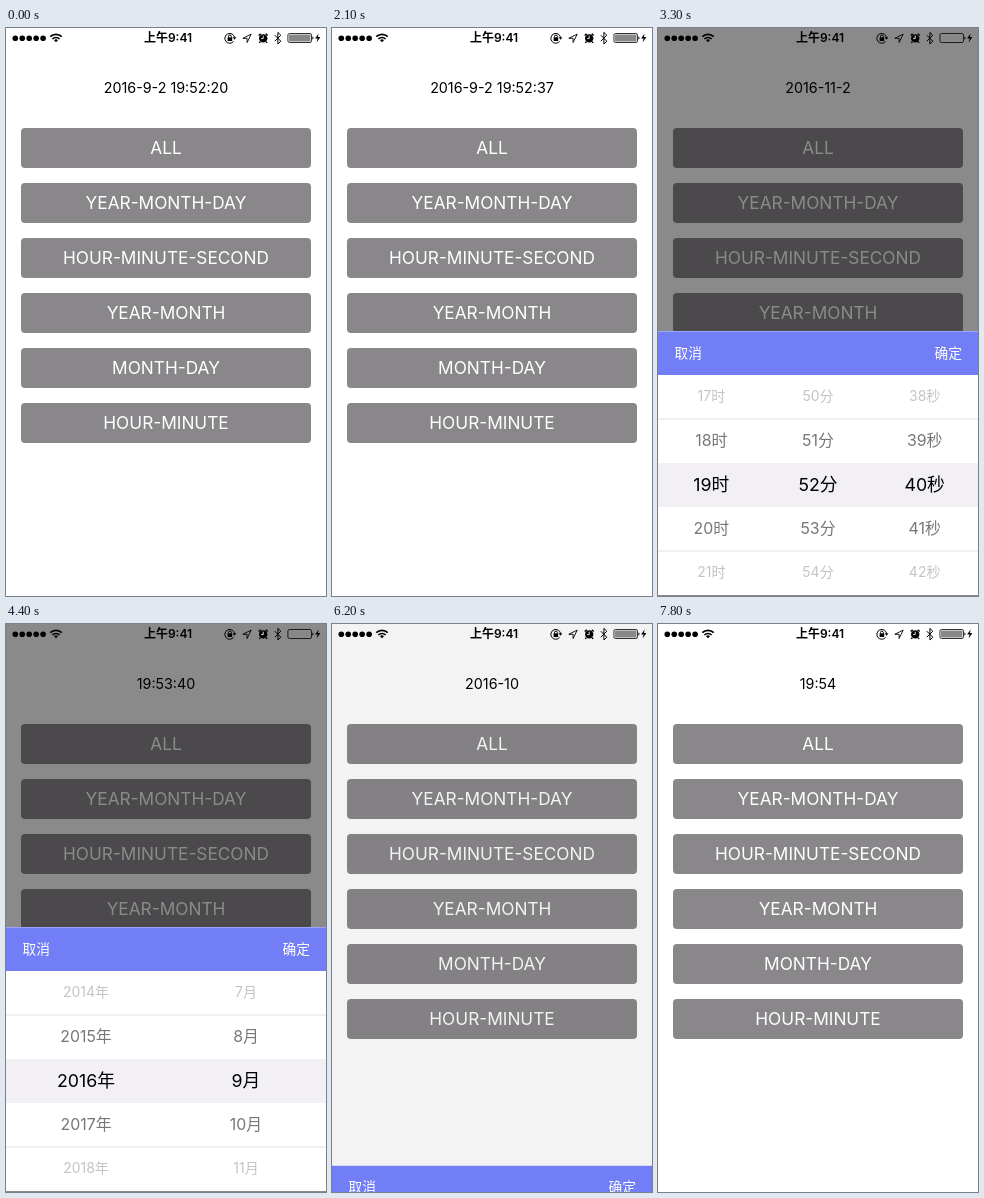
Animation, 320 px wide and 568 px high, one loop 7.9 s. Source, as an HTML page:

```html
<!DOCTYPE html>
<html lang="zh">
<head>
<meta charset="utf-8">
<title>Date picker</title>
<style>
  html, body { margin: 0; width: 100%; height: 100%; overflow: hidden; background: #fff; }
  svg { display: block; width: 100vw; height: 100vh; }
  text { font-family: Inter, 'Noto Sans CJK SC', 'Noto Sans CJK', sans-serif; }
  .mid { text-anchor: middle; }
  .line { fill: none; stroke: #000; }
</style>
</head>
<body>
<svg viewBox="0 0 320 568">
  <rect width="320" height="568" fill="#fff"/>
  <text id="date" class="mid" x="160" y="65.2" font-size="14.3"></text>
  <g id="buttons" class="mid" font-size="17.25" fill="#fff"></g>
  <rect id="shade" width="320" height="568"/>

  <g id="status">
    <g id="dots"></g>
    <g class="line" stroke-width="1.7">
      <path d="M44.3 8.6a8.2 8.2 0 0 1 11.4 0M46.4 11a5.2 5.2 0 0 1 7.2 0"/>
    </g>
    <path d="M50 14.3l-2-2.1a2.9 2.9 0 0 1 4 0z"/>
    <text class="mid" x="162" y="14.3" font-size="12" font-weight="600">上午9:41</text>
    <path class="line" d="M227.6 13.4a4.9 4.9 0 1 1 1-3.8"/>
    <path d="M226.6 9.2h3.8l-1.9 2.5z"/>
    <rect x="221.6" y="9.3" width="4.6" height="3.7"/>
    <path class="line" d="M222.5 9.5v-1a1.4 1.4 0 0 1 2.8 0v1"/>
    <path class="line" stroke-width=".9" d="M236.8 10.3l8.4-4.2-4.1 8.4v-4.2z"/>
    <circle cx="257.2" cy="10.4" r="4.2"/>
    <path class="line" stroke-width="1.5" d="M252.7 7.5l2-1.8M261.7 7.5l-2-1.8M254.3 13.6l-1 1.3M260.1 13.6l1 1.3"/>
    <path d="M257.2 7.7v2.9h-2" fill="none" stroke="#fff" stroke-width=".9"/>
    <path class="line" d="M268.8 7.2l6 6-2.9 2.8V4.4l2.9 2.8-6 6"/>
    <rect class="line" x="281.9" y="5.5" width="23.6" height="9" rx="1.6" stroke-width=".8"/>
    <rect x="283" y="6.6" width="21.4" height="6.8" rx=".6" fill="#8a878b"/>
    <path d="M306.4 8.4a1.7 1.7 0 0 1 0 3.2z"/>
    <path d="M312.6 5.4l-3.5 5.2h2.5l-1 4 3.8-5.5h-2.5z"/>
  </g>

  <g id="sheet">
    <rect y="303" width="320" height="264" fill="#fff"/>
    <rect y="435" width="320" height="44" fill="#f2f0f4"/>
    <path d="M0 391h320M0 523h320" stroke="#e2e0e4"/>
    <clipPath id="clip"><rect y="347" width="320" height="220"/></clipPath>
    <g id="rows" class="mid" clip-path="url(#clip)"></g>
    <rect y="303.3" width="320" height="43.7" fill="#717ef5"/>
    <g font-size="13.7" fill="#fff">
      <text x="16.5" y="329.6">取消</text>
      <text x="304" y="329.6" text-anchor="end">确定</text>
    </g>
  </g>
</svg>
<script>
const LOOP = 7900, SLIDE = 250, ROW = 44;
const $ = id => document.getElementById(id);

// unit: [suffix, lowest value, count]
const year = ['年', 0, 9999], month = ['月', 1, 12], day = ['日', 1, 30];
const hour = ['时', 0, 24], minute = ['分', 0, 60], second = ['秒', 0, 60];

// open: slide-in starts; close: slide-out ends; spin: [column, steps]
const pickers = [
  { open: 1250, close: 2000, units: [year, month, day, hour, minute, second],
    from: [2016, 9, 2, 19, 52, 37], spin: [5, 0], result: '2016-9-2 19:52:37' },
  { open: 2150, close: 2900, units: [year, month, day],
    from: [2016, 9, 2], spin: [1, 2], result: '2016-11-2' },
  { open: 3050, close: 4000, units: [hour, minute, second],
    from: [19, 52, 40], spin: [1, 1], result: '19:53:40' },
  { open: 4150, close: 5200, units: [year, month],
    from: [2016, 9], spin: [1, 1], result: '2016-10' },
  { open: 5350, close: 6250, units: [month, day],
    from: [9, 2], spin: [0, 1], result: '10-2' },
  { open: 6450, close: 7600, units: [hour, minute],
    from: [19, 52], spin: [1, 2], result: '19:54' }
];

const labels = ['ALL', 'YEAR-MONTH-DAY', 'HOUR-MINUTE-SECOND', 'YEAR-MONTH', 'MONTH-DAY', 'HOUR-MINUTE'];
$('buttons').innerHTML = labels.map((label, i) =>
  `<rect x="15" y="${100 + i * 55}" width="290" height="40" rx="4" fill="#8a878b"/>
   <text x="160" y="${126.3 + i * 55}">${label}</text>`).join('');
$('dots').innerHTML = [0, 1, 2, 3, 4].map(i =>
  `<circle cx="${9.3 + i * 6.95}" cy="10.3" r="2.8"/>`).join('');

const ease = (t, start, end) => {
  const p = Math.min(1, Math.max(0, (t - start) / (end - start)));
  return p * p * (3 - 2 * p);
};

// Gray level of a row by its distance from the middle
const gray = d => Math.round(d < 1 ? 119 * d : Math.min(225, 119 + 77 * (d - 1)));

function column([suffix, low, count], value, x, scale) {
  let out = '';
  for (let v = Math.round(value) - 3; v <= Math.round(value) + 3; v++) {
    const d = Math.abs(v - value), size = (17.8 - 1.9 * d) * scale, g = gray(d);
    const shown = (v - low + count) % count + low;
    const y = 456.4 + (v - value) * ROW + size * .363;
    out += `<text x="${x}" y="${y}" font-size="${size}" fill="rgb(${g},${g},${g})">${shown}${suffix}</text>`;
  }
  return out;
}

function draw(t) {
  const done = pickers.filter(p => t >= p.close + 100).pop();
  $('date').textContent = done ? done.result : '2016-9-2 19:52:20';

  const p = pickers.find(p => t > p.open && t < p.close);
  let shown = 0;
  if (p) {
    shown = ease(t, p.open, p.open + SLIDE) - ease(t, p.close - SLIDE, p.close);
    const [spun, steps] = p.spin, n = p.units.length;
    const turn = steps * ease(t, p.open + SLIDE, p.close - SLIDE);
    $('rows').innerHTML = p.units.map((unit, i) =>
      column(unit, p.from[i] + (i === spun ? turn : 0), (i + .5) * 320 / n, n > 5 ? .9 : 1)).join('');
  }
  $('shade').setAttribute('opacity', .46 * shown);
  $('sheet').setAttribute('transform', `translate(0 ${265 * (1 - shown)})`);
}

const start = performance.now();
function tick() {
  draw((performance.now() - start) % LOOP);
  requestAnimationFrame(tick);
}
tick();
</script>
</body>
</html>
```
